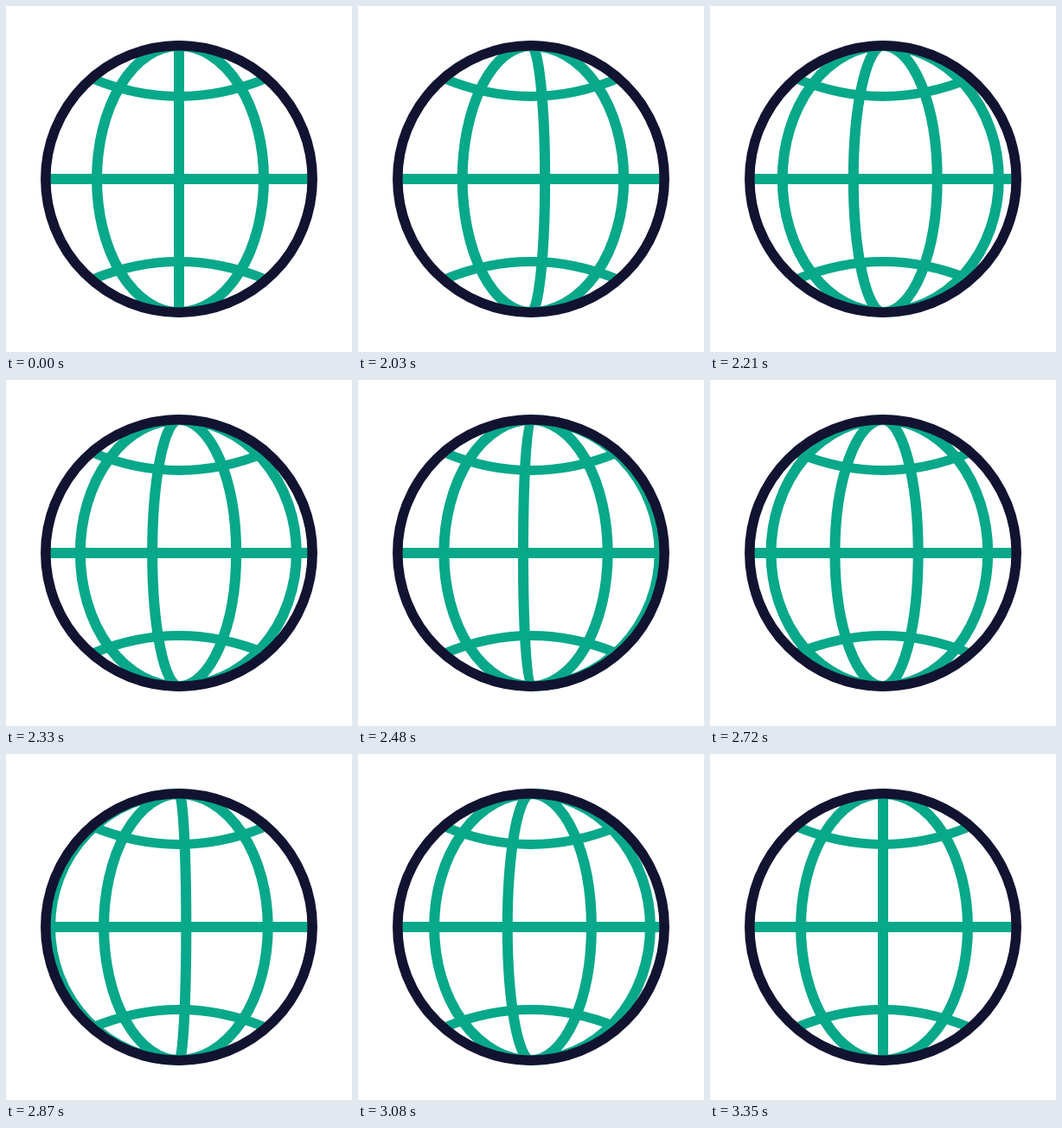
An HTML page for the animation above (3440 ms loop, 400 px wide and 400 px high).

```html
<!DOCTYPE html>
<html lang="en">
<head>
<meta charset="utf-8">
<title>Spinning globe</title>
<style>
  html, body { margin: 0; width: 100%; height: 100%; overflow: hidden; background: #fff; }
  svg { display: block; width: 100%; height: 100%; }
  path { fill: none; stroke: #08a88a; stroke-width: 12; }
  circle { fill: none; stroke: #121331; stroke-width: 11.5; }
</style>
</head>
<body>
<svg viewBox="0 0 400 400">
  <path d="M46 200H354"/>
  <path d="M100 84Q200 125 300 84M100 316Q200 275 300 316" style="stroke-width:11"/>
  <path id="meridians"/>
  <circle cx="200" cy="200" r="154.2"/>
</svg>
<script>
  const LOOP = 3440, START = 2030, END = 3350, STEP = 30;
  const MID = 200, RADIUS = 154;

  // Equator x of the five stops each meridian passes, left rim to right rim.
  const stops = [46, 105, 200, 298, 354];

  // Time in ms, stops travelled.
  const keys = [[2000, 0], [2030, .165], [2210, 1.64], [2480, 3.905],
                [2720, 5.415], [2870, 6.085], [3350, 7]];

  const slope = i => (keys[i + 1][1] - keys[i][1]) / (keys[i + 1][0] - keys[i][0]);
  const speeds = keys.map((key, i) => {
    if (i === 0) return slope(0);
    if (i === keys.length - 1) return 0;
    const before = key[0] - keys[i - 1][0], after = keys[i + 1][0] - key[0];
    return (after * slope(i - 1) + before * slope(i)) / (before + after);
  });

  // Smooth cubic through the keys.
  function travel(t) {
    if (t < START || t >= END) return 0;
    let i = 0;
    while (t >= keys[i + 1][0]) i++;
    const [t0, u0] = keys[i], [t1, u1] = keys[i + 1];
    const h = t1 - t0, s = (t - t0) / h, r = 1 - s;
    return u0 + (u1 - u0) * s * s * (3 - 2 * s)
      + h * s * r * (speeds[i] * r - speeds[i + 1] * s);
  }

  function meridian(x) {
    const rx = Math.max(Math.abs(x - MID), .01);
    const sweep = x > MID ? 1 : 0;
    return `M${MID} ${MID - RADIUS}A${rx} ${RADIUS} 0 0 ${sweep} ${MID} ${MID + RADIUS}`;
  }

  const lines = document.getElementById('meridians');

  function draw(now) {
    const t = now % LOOP;
    const u = travel(START + STEP * Math.floor((t - START) / STEP));
    const f = u % 1;
    // The line entering at the left rim is not there at the very start.
    const first = u < .2 ? 1 : 0;
    const last = u ? 3 : 2;
    let d = '';
    for (let i = first; i <= last; i++) {
      d += meridian(stops[i] + (stops[i + 1] - stops[i]) * f);
    }
    // At rest only the three inner stops carry a line.
    if (!u) d = stops.slice(1, 4).map(meridian).join('');
    lines.setAttribute('d', d);
  }

  function tick() {
    draw(performance.now());
    requestAnimationFrame(tick);
  }
  tick();
</script>
</body>
</html>
```
